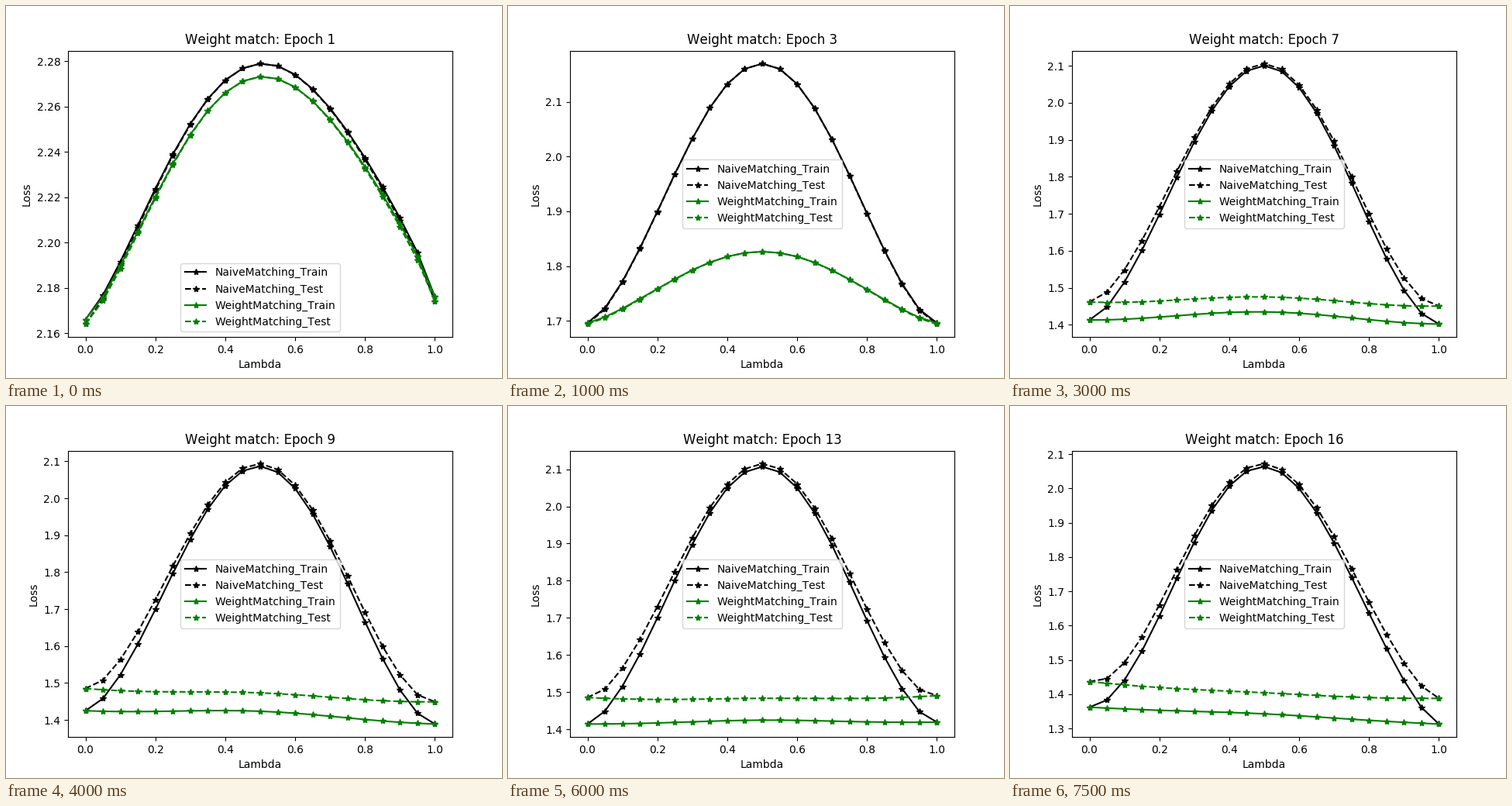
These frames come from a looping animation (640 by 480 pixels, 8 s). A matplotlib script:

```python
import numpy as np
import matplotlib.pyplot as plt
from matplotlib.animation import FuncAnimation

plt.rcParams["text.kerning_factor"] = 6

EPOCHS = 16
LAM = np.linspace(0, 1, 21)
U = 2 * LAM - 1

# key points of the training loss at lambda = 0, 1 and 0.5
KEYS = np.array([1, 3, 5, 7, 8, 9, 11, 13, 16])
START = [2.166, 1.696, 1.49, 1.413, 1.45, 1.425, 1.386, 1.414, 1.362]
END = [2.176, 1.696, 1.49, 1.402, 1.43, 1.389, 1.384, 1.419, 1.313]
PEAK = [2.279, 2.170, 2.13, 2.100, 2.12, 2.087, 2.098, 2.107, 2.064]

STYLES = [
    ("NaiveMatching_Train", "black", "-"),
    ("NaiveMatching_Test", "black", "--"),
    ("WeightMatching_Train", "green", "-"),
    ("WeightMatching_Test", "green", "--"),
]


def decay(epoch):
    return 1 - np.exp(-epoch / 5)


def at(epoch, values):
    """Value between key points, slowing down as training goes on."""
    return np.interp(decay(epoch), decay(KEYS), values)


def bell(power, skew):
    wave = np.clip(np.sin(np.pi * LAM), 0, 1)
    return wave ** (power + skew * U - .08 * U**2)


def gap(epoch, middle):
    """Test minus train loss: widest at both ends."""
    late = .08 * (1 - np.exp(-max(epoch - 3, 0) / 4))
    return late * (middle + (1 - middle) * U**2) - .002 * U**2


def losses(epoch):
    start, end = at(epoch, START), at(epoch, END)
    line = start + (end - start) * LAM
    height = at(epoch, PEAK) - (start + end) / 2
    bump = 1.35 * epoch**2 / (epoch**4 + 12.2)
    skew = .07 - .27 * ((epoch - 8.5) / 7.5)**6

    naive = line + height * bell(1.73 - .58 * .41**(epoch - 1), skew)
    weight = line + bump * bell(1.17 + .13 * (epoch - 1), skew)
    return naive, naive + gap(epoch, .11), weight, weight + gap(epoch, .8)


fig, ax = plt.subplots(figsize=(6.4, 4.8), dpi=100)


def draw(i):
    epoch = i + 1
    ax.clear()
    for y, (label, color, ls) in zip(losses(epoch), STYLES):
        ax.plot(LAM, y, color=color, linestyle=ls, marker="*", label=label)
    ax.set_title(f"Weight match: Epoch {epoch}")
    ax.set_xlabel("Lambda")
    ax.set_ylabel("Loss")
    ax.legend()
    return ax.get_children()


anim = FuncAnimation(fig, draw, frames=EPOCHS, init_func=lambda: [],
                     interval=500, repeat=True, repeat_delay=0)
plt.show()
```
